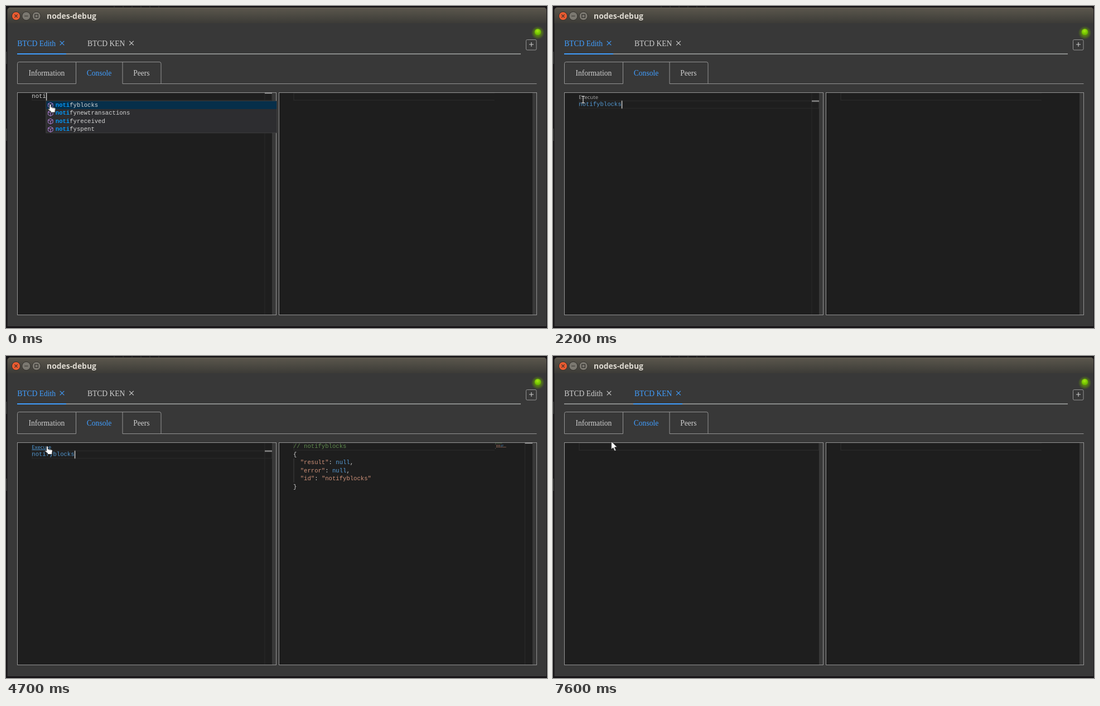
An HTML page that plays this animation: 970 by 578 pixels, repeating every 8000 ms.

```html
<!DOCTYPE html>
<html lang="en">
<head>
<meta charset="utf-8">
<title>nodes-debug</title>
<style>
html, body { margin: 0; width: 100%; height: 100%; overflow: hidden; background: #383838; }
svg { display: block; width: 970px; height: 578px; }
text { white-space: pre; }
.title { font: bold 13.9px "Open Sans", "Noto Sans", sans-serif; fill: #dfdbd2; }
.tab { font: 13.55px "Liberation Serif", serif; fill: #d0d0d0; }
.code { font: 10.6px "Liberation Mono", monospace; fill: #d4d4d4; }
.lens { font: 9.5px "Noto Sans", sans-serif; fill: #a2a2a2; }
.blue { fill: #409eff; }
.word { fill: #569cd6; }
.str { fill: #ce9178; }
.note { fill: #608b4e; }
.match { fill: #0097fb; font-weight: bold; }
.frame { fill: none; stroke: #949494; }
.faint { fill: none; stroke: #2b2b2b; }
.cross { fill: none; stroke: #d0d0d0; stroke-width: 1.1; }

/* one loop is 8 s: 1% = 80 ms, every change is a hard cut */
.anim { animation: 8s step-end infinite; }
.suggest { animation-name: suggest; }
.typed { animation-name: typed; }
.row { animation-name: row; }
.first { animation-name: first; }
.caret { animation-name: caret; }
.lens { animation-name: lens; }
.output { animation-name: output; }
.slider { animation-name: slider; }
.bar { animation-name: bar; }
.tab1 { animation-name: tab1; }
.cross1 { animation-name: cross1; }
.tab2 { animation-name: tab2; }
.cross2 { animation-name: cross2; }
.pointer { animation-name: pointer; }
.hand { animation-name: hand; }
.beam { animation-name: beam; }
.arrow { animation-name: arrow; }

@keyframes suggest { 0% { opacity: 1 } 15%, 100% { opacity: 0 } }
@keyframes typed { 0% { opacity: 0 } 15% { opacity: 1 } 85%, 100% { opacity: 0 } }
@keyframes first { 0% { opacity: 1 } 85%, 100% { opacity: 0 } }
@keyframes row {
  0% { transform: translateY(0) }
  18.75% { transform: translateY(14.4px) }
  85%, 100% { transform: translateY(0) }
}
@keyframes caret {
  0% { opacity: 1; transform: translateX(0) }
  2.5% { opacity: 0; transform: translateX(0) }
  8.75% { opacity: 1; transform: translateX(0) }
  15% { opacity: 1; transform: translateX(51px) }
  21.25% { opacity: 0; transform: translateX(51px) }
  27.5% { opacity: 1; transform: translateX(51px) }
  51.25% { opacity: 0; transform: translateX(51px) }
  58.75% { opacity: 1; transform: translateX(51px) }
  62.5% { opacity: 0; transform: translateX(51px) }
  72.5% { opacity: 1; transform: translateX(51px) }
  76.25%, 100% { opacity: 0; transform: translateX(51px) }
}
@keyframes lens {
  0% { opacity: 0; fill: #a2a2a2; text-decoration-line: none }
  18.75% { opacity: 1; fill: #a2a2a2; text-decoration-line: none }
  40% { opacity: 1; fill: #4e94ce; text-decoration-line: underline }
  62.5% { opacity: 1; fill: #a2a2a2; text-decoration-line: none }
  85%, 100% { opacity: 0; fill: #a2a2a2; text-decoration-line: none }
}
@keyframes output { 0% { opacity: 0 } 47.5% { opacity: 1 } 85%, 100% { opacity: 0 } }
@keyframes slider { 0% { opacity: 0 } 47.5% { opacity: 1 } 58.75%, 100% { opacity: 0 } }
@keyframes bar {
  0% { transform: translateX(0) }
  85% { transform: translateX(115px) }
  91.25%, 100% { transform: translateX(124px) }
}
@keyframes tab1 { 0% { fill: #409eff } 85%, 100% { fill: #d0d0d0 } }
@keyframes cross1 { 0% { stroke: #409eff } 85%, 100% { stroke: #d0d0d0 } }
@keyframes tab2 { 0% { fill: #d0d0d0 } 68.75%, 100% { fill: #409eff } }
@keyframes cross2 { 0% { stroke: #d0d0d0 } 68.75% { stroke: #8fc2f5 } 72.5%, 100% { stroke: #409eff } }
@keyframes pointer {
  0% { transform: translate(79.5px, 176.5px) }
  15% { transform: translate(81.5px, 177.5px) }
  25% { transform: translate(74px, 174px) }
  26.25% { transform: translate(62px, 170px) }
  27.5% { transform: translate(54px, 168px) }
  28.75% { transform: translate(58px, 168px) }
  30% { transform: translate(68px, 170px) }
  31.25% { transform: translate(76px, 172px) }
  40% { transform: translate(74px, 162px) }
  62.5% { transform: translate(74px, 140px) }
  68.75% { transform: translate(154px, 75.5px) }
  72.5% { transform: translate(170px, 73px) }
  76.25% { transform: translate(178px, 70px) }
  91.25% { transform: translate(134.5px, 123px) }
  95%, 100% { transform: translate(104.5px, 153px) }
}
@keyframes hand {
  0% { opacity: 1 } 15% { opacity: 0 } 40% { opacity: 1 }
  62.5% { opacity: 0 } 68.75% { opacity: 1 } 91.25%, 100% { opacity: 0 }
}
@keyframes beam { 0% { opacity: 0 } 15% { opacity: 1 } 40%, 100% { opacity: 0 } }
@keyframes arrow {
  0% { opacity: 0 } 62.5% { opacity: 1 } 68.75% { opacity: 0 } 91.25%, 100% { opacity: 1 }
}
</style>
</head>
<body>
<svg viewBox="0 0 970 578" xmlns="http://www.w3.org/2000/svg">
  <defs>
    <linearGradient id="titlebar" x2="0" y2="1">
      <stop offset="0" stop-color="#5b574d"/><stop offset="1" stop-color="#3c3b37"/>
    </linearGradient>
    <radialGradient id="led" cx=".45" cy=".35">
      <stop offset="0" stop-color="#a4ea10"/><stop offset="1" stop-color="#6fc000"/>
    </radialGradient>
    <radialGradient id="glow">
      <stop offset=".45" stop-color="#6fb000" stop-opacity=".6"/><stop offset="1" stop-color="#6fb000" stop-opacity="0"/>
    </radialGradient>
    <path id="x" d="M-3.8-3.8 3.8 3.8M3.8-3.8-3.8 3.8"/>
    <path id="cube" d="M0-4.8 4.3-2.6V2.6L0 4.8-4.3 2.6V-2.6ZM-4.3-2.6 0-.4 4.3-2.6M0-.4V4.8" fill="none" stroke="#b180d7"/>
  </defs>

  <!-- window -->
  <rect width="970" height="578" fill="#161416"/>
  <path d="M193 1.5h82" stroke="#333" stroke-dasharray="2 14"/>
  <path d="M2.5 575V8q0-5 5-5H965q4 0 4 5V575Z" fill="#383838"/>
  <path d="M2.5 31V8q0-5 5-5H965q4 0 4 5V31Z" fill="url(#titlebar)"/>
  <path d="M6 3.2H966" stroke="#696459"/>
  <path d="M0 82v22M0 220v22" stroke="#3a3a3a" stroke-width="3"/>
  <g stroke="#302f2b">
    <circle cx="18" cy="18" r="7.6" fill="#ea5b30"/>
    <circle cx="36.3" cy="18" r="7.6" fill="#7b7870"/>
    <circle cx="54.6" cy="18" r="7.6" fill="#7b7870"/>
    <path d="M15.4 15.4l5.2 5.2m0-5.2-5.2 5.2M33 18h6.6M51.8 15.3h5.6v5.4h-5.6Z" fill="none" stroke-width="1.2"/>
  </g>
  <text class="title" x="73" y="22.8">nodes-debug</text>

  <!-- node tabs -->
  <text class="tab anim tab1" x="20.2" y="71.7">BTCD Edith</text>
  <use class="cross anim cross1" href="#x" x="100.5" y="66.6"/>
  <text class="tab anim tab2" x="146" y="71.7">BTCD KEN</text>
  <use class="cross anim cross2" href="#x" x="225" y="66.6"/>
  <rect x="20" y="85" width="903" height="2" fill="#8a8c8b"/>
  <rect class="blue anim bar" x="20" y="85" width="88" height="2"/>
  <rect class="frame" x="932.5" y="60.5" width="18.5" height="18.5" rx="2"/>
  <path class="cross" d="M938 69h8M942 65v8"/>
  <circle cx="953.5" cy="48" r="12" fill="url(#glow)"/>
  <circle cx="953.5" cy="46.5" r="5.6" fill="url(#led)"/>

  <!-- view tabs -->
  <path class="frame" d="M125.5 139.5H20.5V103.5q0-3 3-3H275q3 0 3 3V139.5M125.5 100.5v39M209 100.5v39H951.5"/>
  <text class="tab" x="40.5" y="125">Information</text>
  <text class="tab blue" style="fill:#409eff" x="144.8" y="125">Console</text>
  <text class="tab" x="228.3" y="125">Peers</text>

  <!-- input editor -->
  <rect x="20.5" y="155.5" width="464" height="399" fill="#1e1e1e"/>
  <rect x="477" y="156" width="7" height="398" fill="#383838"/>
  <path class="faint anim first" d="M464 156V554"/>
  <g class="anim row">
    <rect class="faint" x="47" y="156" width="429.5" height="13.2" stroke-width="1.3"/>
    <rect class="anim first" x="464" y="155.3" width="13" height="2" fill="#a0a0a0"/>
    <text class="code anim suggest" x="46.3" y="165.2">noti</text>
    <text class="code word anim typed" style="fill:#569cd6" x="46.3" y="165.2">notifyblocks</text>
    <rect class="anim caret" x="71.8" y="155.6" width="1.5" height="14" fill="#c8c8c8"/>
  </g>
  <text class="lens anim" x="46.3" y="166.8">Execute</text>
  <rect class="frame" x="20.5" y="155.5" width="464" height="399"/>

  <g class="anim suggest">
    <rect x="71.8" y="170.4" width="414" height="57.4" fill="#2d2d30" stroke="#454545" stroke-width=".8"/>
    <rect x="72.2" y="170.8" width="413" height="14.2" fill="#062f4a"/>
    <use href="#cube" x="79.8" y="178"/><use href="#cube" x="79.8" y="192.5"/>
    <use href="#cube" x="79.8" y="207"/><use href="#cube" x="79.8" y="221.5"/>
    <text class="code" x="88.8" y="180.8"><tspan class="match">noti</tspan>fyblocks</text>
    <text class="code" x="88.8" y="195.2"><tspan class="match">noti</tspan>fynewtransactions</text>
    <text class="code" x="88.8" y="209.7"><tspan class="match">noti</tspan>fyreceived</text>
    <text class="code" x="88.8" y="224.2"><tspan class="match">noti</tspan>fyspent</text>
  </g>

  <!-- output editor -->
  <rect x="489.5" y="155.5" width="462" height="399" fill="#1e1e1e"/>
  <rect x="944" y="156" width="7" height="398" fill="#383838"/>
  <path class="faint" stroke-width="1.3" d="M876 156H516v13.2H876"/>
  <g class="anim output">
    <path class="faint" d="M930.5 156V554"/>
    <path d="M516 184v43" stroke="#404040"/>
    <rect class="anim slider" x="930.5" y="156" width="13.5" height="316.5" fill="#424242"/>
    <rect x="930.5" y="155.3" width="13.5" height="2" fill="#a0a0a0"/>
    <g class="code">
      <text class="note" x="515" y="165.2">// notifyblocks</text>
      <text x="515" y="179.8">{</text>
      <text x="515" y="194.2">  <tspan class="str">"result"</tspan>: <tspan class="word">null</tspan>,</text>
      <text x="515" y="208.7">  <tspan class="str">"error"</tspan>: <tspan class="word">null</tspan>,</text>
      <text x="515" y="223.1">  <tspan class="str">"id"</tspan>: <tspan class="str">"notifyblocks"</tspan></text>
      <text x="515" y="237.8">}</text>
    </g>
    <g fill="none" stroke-width="1" stroke-dasharray="2 .6" opacity=".65">
      <path d="M877 156.6h13" stroke="#608b4e"/>
      <path d="M877 158.3h1M877 165.8h1" stroke="#999"/>
      <path d="M879 160h8M879 161.8h7M879 163.6h18" stroke="#ce9178"/>
      <path d="M888 160h4M887 161.8h4" stroke="#569cd6"/>
    </g>
  </g>
  <rect class="frame" x="489.5" y="155.5" width="462" height="399"/>

  <!-- mouse pointer -->
  <g class="anim pointer">
    <g class="anim hand">
      <path d="M-1.6 8.5V1.2a1.5 1.5 0 0 1 3 0V5l6.4 1.3q1.6.4 1.5 2L8.6 11.5V14.5H.6V12.6L-4 9.3q-.6-1.8 1-1.7Z" fill="#fff" stroke="#111" stroke-width=".8"/>
      <path d="M3.7 5.6V8M6 6V8.2" stroke="#777" stroke-width=".6"/>
    </g>
    <g class="anim beam" fill="none">
      <path d="M-2.8-5.8H2.8M-2.8 5.8H2.8M0-5.8V5.8" stroke="#0c0c0c" stroke-width="2.6"/>
      <path d="M-2.8-5.8H2.8M-2.8 5.8H2.8M0-5.8V5.8" stroke="#eee" stroke-width="1.2"/>
    </g>
    <path class="anim arrow" d="M0 0V14.8L3.4 11.8 5.9 17.6 8.5 16.4 6 10.8H10.6Z" fill="#fff" stroke="#111" stroke-width=".8"/>
  </g>
</svg>
</body>
</html>
```
